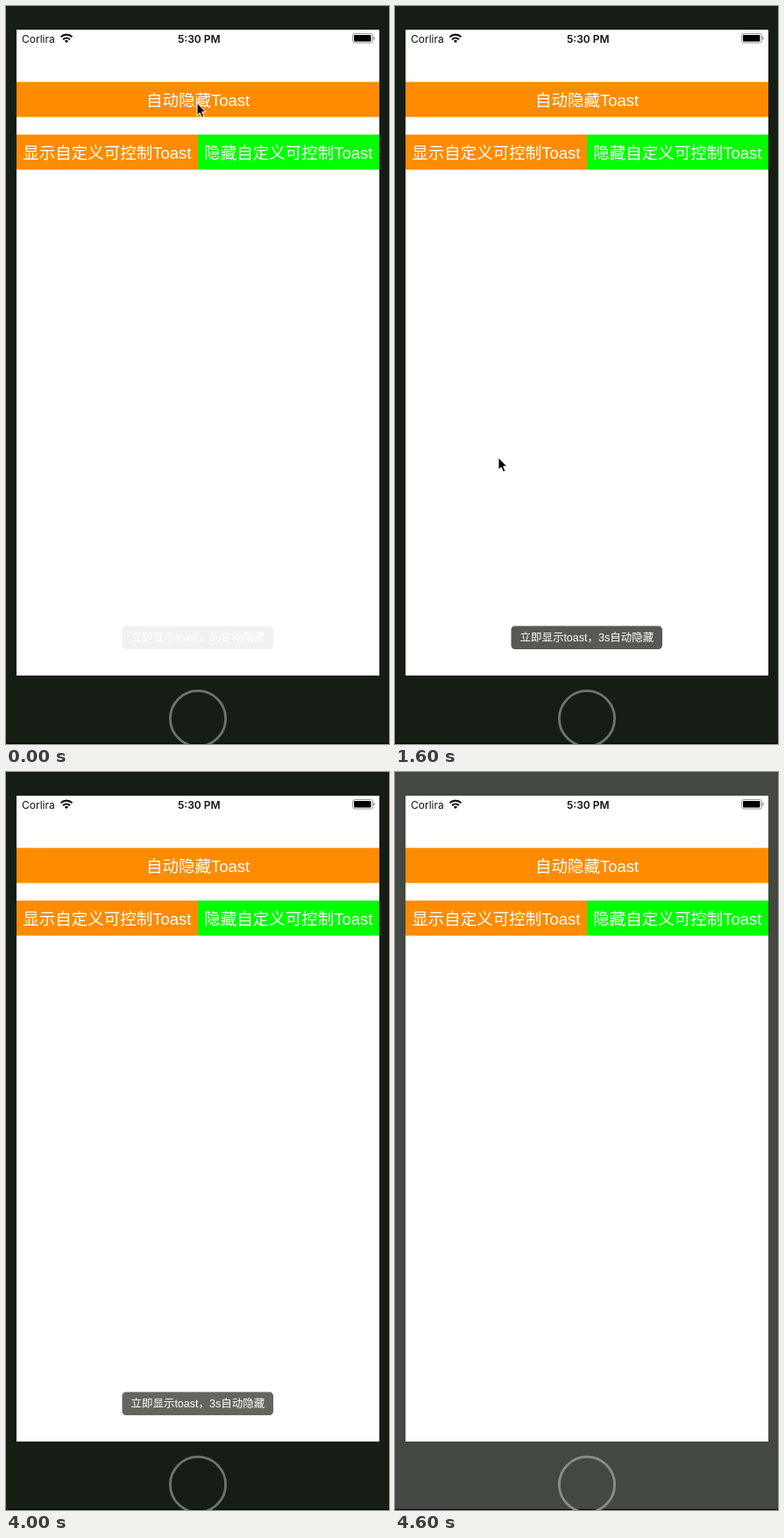
Recreate the animation shown at these times as an HTML page. Size 437 by 841 pixels, loop 4700 ms.

```html
<!DOCTYPE html>
<html lang="zh">
<head>
<meta charset="utf-8">
<style>
html, body { margin: 0; height: 100%; overflow: hidden; background: #161d15; }
svg { display: block; }
text { font-family: "Liberation Sans", "Noto Sans CJK SC", "Noto Sans CJK", sans-serif; text-anchor: middle; fill: #fff; }
.label { font-size: 18.5px; }
.status { font: 12px Inter, sans-serif; fill: #111; }
</style>
</head>
<body>
<svg width="437" height="841" viewBox="0 0 437 841">
  <rect id="bezel" width="437" height="841"/>
  <path d="M0 840.5H437" stroke="#000"/>
  <circle id="home" cx="219" cy="812" r="31.6" fill="none" stroke-width="2.8"/>
  <rect x="12" y="27" width="414" height="736" fill="#fff"/>

  <text class="status" x="18" y="41.5" style="text-anchor:start">Corlira</text>
  <g fill="none" stroke="#111" stroke-width="2.2">
    <path d="M62.6 35.2A9.4 9.4 0 0 1 75.4 35.2M65.1 38.1A5.6 5.6 0 0 1 72.9 38.1"/>
    <path d="M69 42L66.9 39.9A3 3 0 0 1 71.1 39.9Z" fill="#111" stroke="none"/>
  </g>
  <text class="status" x="220.3" y="41.5" style="font-weight:600">5:30 PM</text>
  <rect x="395.5" y="31.5" width="23" height="10.5" rx="2.5" fill="none" stroke="#999"/>
  <rect x="397" y="33" width="19.5" height="7.5" rx="1" fill="#000"/>
  <path d="M420 35v3.5" stroke="#999" stroke-width="1.3"/>

  <rect x="12" y="86.5" width="414" height="40" fill="#ff8c00"/>
  <rect x="12" y="146.5" width="207" height="40" fill="#ff8c00"/>
  <rect x="219" y="146.5" width="207" height="40" fill="#0f0"/>
  <text class="label" x="219" y="113.5">自动隐藏Toast</text>
  <text class="label" x="115.3" y="173.5">显示自定义可控制Toast</text>
  <text class="label" x="322.3" y="173.5">隐藏自定义可控制Toast</text>

  <g id="toast">
    <rect x="132.5" y="706.5" width="172.5" height="26.5" rx="4.5" fill="#555a52"/>
    <text x="218.8" y="724.3" font-size="12.5">立即显示toast，3s自动隐藏</text>
  </g>
  <path id="cursor" d="M0 0V14L3.2 11.2L5.5 16.5L7.9 15.5L5.7 10.2H10Z" fill="#000" stroke="#fff"/>
</svg>
<script>
const LOOP = 4700, STEP = 100;
const el = id => document.getElementById(id);
const bezel = el('bezel'), home = el('home'), toast = el('toast'), cursor = el('cursor');

// Smooth fade progress, 0 to 1
function ease(t, start, length) {
  const p = Math.min(1, Math.max(0, (t - start) / length));
  return p < .5 ? 2 * p * p : 1 - 2 * (1 - p) ** 2;
}

function draw(t) {
  toast.setAttribute('opacity', ease(t, -133, 667) - ease(t, 3880, 600));

  // The pointer rests, then speeds off to the lower left
  const k = Math.max(0, t - 1100) / 500;
  cursor.setAttribute('transform', `translate(${218 - 100 * k ** 1.27} ${110.5 + 404 * k * k})`);
  cursor.setAttribute('visibility', t < 1800 ? 'visible' : 'hidden');

  const light = t >= 4600;
  bezel.setAttribute('fill', light ? '#434842' : '#161d15');
  home.setAttribute('stroke', light ? '#8a8f89' : '#6e756c');
}

function tick() {
  const t = performance.now() % LOOP;
  draw(Math.floor(t / STEP) * STEP);
  requestAnimationFrame(tick);
}
tick();
</script>
</body>
</html>
```
